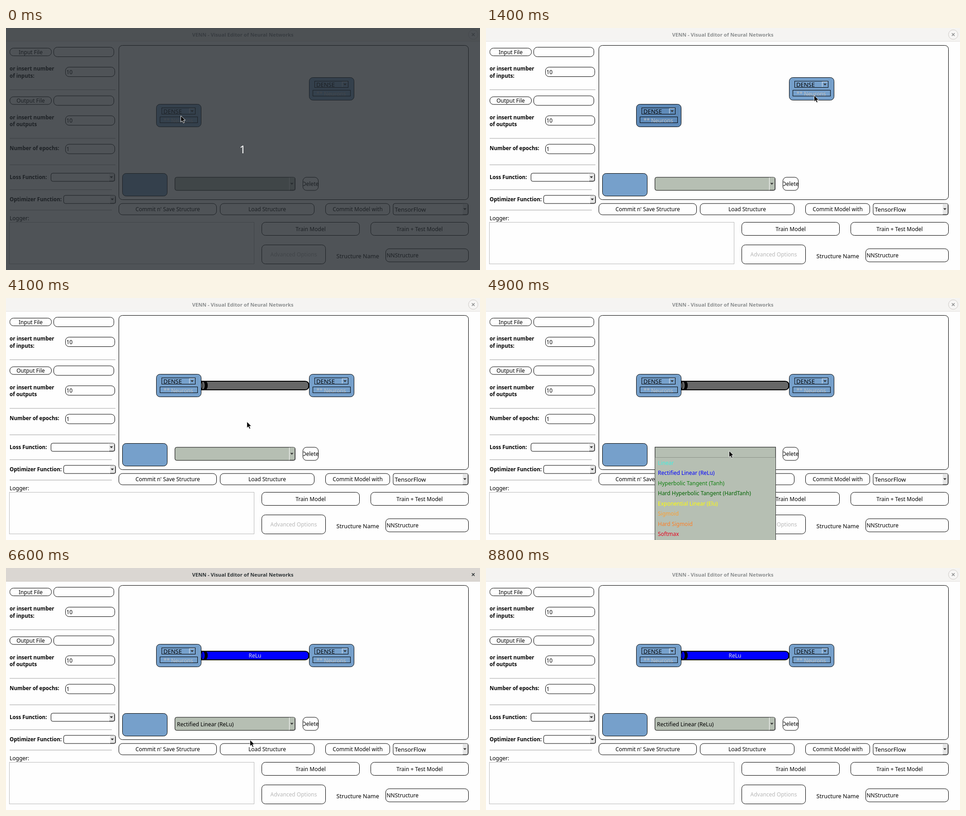
An HTML page that plays this animation: 1048 by 535 pixels, repeating every 8900 ms.

```html
<!DOCTYPE html>
<html lang="en">
<head>
<meta charset="utf-8">
<title>Visual Editor of Neural Networks</title>
<style>
html, body { margin: 0; width: 100%; height: 100%; overflow: hidden; background: #fefefe; }
svg { display: block; font: 12px "Noto Sans", "Open Sans", sans-serif; }
text { white-space: pre; }
.bold { font-weight: bold; font-size: 11.6px; }
</style>
</head>
<body>
<svg id="stage" width="1048" height="535" viewBox="0 0 1048 535"></svg>
<script>
const LOOP = 8900, STEP = 100, ROW = 22.5;
const BLUE = '#76a0cb', SAGE = '#b6bfb3', PAPER = '#fefefe';

const rect = (x, y, w, h, rx = 8, fill = PAPER, stroke = '#000') =>
  `<rect x="${x + .5}" y="${y + .5}" width="${w}" height="${h}" rx="${rx}" fill="${fill}" stroke="${stroke}"/>`;
const text = (x, y, s, o = '') => `<text x="${x}" y="${y}" ${o}>${s}</text>`;
const mid = (x, y, s, o = '') => text(x, y, s, 'text-anchor="middle" ' + o);
const bold = (x, y, s) => text(x, y, s, 'class="bold"');
const path = (d, stroke, width = 1, fill = 'none') =>
  `<path d="${d}" stroke="${stroke}" stroke-width="${width}" fill="${fill}"/>`;
const arrow = (x, y) => path(`M${x - 3.5} ${y - 2}h7l-3.5 4z`, 'none', 0, '#333');
const button = (x, y, w, h, s, o) => rect(x, y, w, h) + mid(x + w / 2 + .5, y + h / 2 + 5, s, o);
const field = (x, y, w, h, s = '') => rect(x, y, w, h) + text(x + 2.5, y + h / 2 + 5.2, s);
const rule = (y, end) => path(`M8 ${y + .5}H${end}`, '#a0a0a0');

function combo(x, y, w, h, fill = PAPER, side = '#e6e6e6') {
  const right = x + w, bottom = y + h;
  return rect(x, y, w, h, 4, fill) +
    rect(right - 12, y + 1, 11, h - 2, 2, side, side) +
    path(`M${right - 12.5} ${y + 1}V${bottom}`, '#fff') +
    path(`M${right - 12} ${bottom}h9q3 0 3 -3V${y + 3}`, '#444', 1.5) +
    arrow(right - 7, y + h / 2 + .5);
}

const node = (x, y, fill) =>
  rect(x, y, 99, 50, 8, fill) +
  rect(x + 12, y + 8, 74, 14, 0, 'none') +
  text(x + 16, y + 20.7, 'DENSE', 'font-size="13"') +
  path(`M${x + 73.5} ${y + 21}v-11h12`, '#dfe8f1') +
  arrow(x + 79.5, y + 16) +
  rect(x + 8, y + 28, 83, 13, 0, 'none') +
  mid(x + 49, y + 40.5, '** Neurons', 'fill="#c0c0c0"');

const link = (fill, label) =>
  path('M432 184H661Q669.5 184 669.5 193.5T661 203H432z', '#000', 2, fill) +
  path('M432 183h8q6 2 6 10.5t-6 10h-8z', 'none', 0, '#000') +
  `<ellipse cx="435.5" cy="193.5" rx="3.8" ry="8.5" fill="${fill}"/>` +
  path('M433 186q4 7.5 0 15', '#000') +
  mid(550.5, 197.8, label, 'fill="#ddd"');

const ITEMS = [
  ['', '#000'], ['Linear', '#40f0e0'], ['Rectified Linear (ReLu)', '#00f'],
  ['Hyperbolic Tangent (Tanh)', '#108010'], ['Hard Hyperbolic Tangent (HardTanh)', '#006400'],
  ['Exponential Linear (Elu)', '#ff0'], ['Sigmoid', '#ffa030'],
  ['Hard Sigmoid', '#ff7f24'], ['Softmax', '#e8001c']
];

const menu = hover => rect(373, 329, 267, 220, 0, SAGE, '#333') +
  ITEMS.map(([s, c], i) => {
    const y = 330 + ROW * i, on = i === hover;
    return (on ? rect(374, Math.round(y), 265, 22, 0, 'none', '#8c938a') : '') +
      text(380, y + 16.3, s, `fill="${on ? '#7c7c7c' : c}"`);
  }).join('');

function titleBar(active) {
  const ink = active ? '#2e3436' : '#8b8e8f';
  return `<rect width="1048" height="30" fill="${active ? '#dad6d2' : '#f5f4f2'}"/>` +
    path('M0 29.5H1048', active ? '#c8c3bd' : '#e2dfdc') +
    mid(523.5, 19, 'VENN - Visual Editor of Neural Networks',
      `font-weight="bold" font-size="11.2" fill="${ink}"`) +
    (active ? '' : '<circle cx="1033" cy="14.5" r="10.5" fill="#f7f6f5" stroke="#cdc9c5"/>') +
    path('M1030 11.5l6 6m0 -6l-6 6', ink, 1.7);
}

const fileGroup = (name, label, y) =>
  button(8, y + 1, 92, 17, name + ' File') + field(105, y - 1, 133, 21) +
  bold(8, y + 51, 'or insert number') + bold(8, y + 66.5, label) +
  field(131, y + 43, 109, 21, '10') + rule(y + 93, 242);

const form =
  fileGroup('Input', 'of inputs:', 43) + fileGroup('Output', 'of outputs', 150.5) +
  bold(8, 269.5, 'Number of epochs:') + field(131, 256.5, 109, 21, '1') + rule(302, 242) +
  bold(8, 333.5, 'Loss Function:') + combo(99, 320.5, 141, 18) + rule(357, 234) +
  bold(8, 382.5, 'Optimizer Function:') + combo(127, 369.5, 115, 18) + rule(402, 234) +
  text(8, 425, 'Logger:') + rect(7, 429, 541, 92, 0, PAPER, '#b8b8b8') +
  rect(249, 38, 773, 341) + rect(257, 321, 99, 50, 8, BLUE) +
  '<clipPath id="clip"><rect x="656" y="329" width="35" height="31"/></clipPath>' +
  rect(656, 329.5, 34, 29) + mid(673, 349.3, 'Delete', 'clip-path="url(#clip)"') +
  button(249, 387.5, 216, 25, "Commit n' Save Structure") +
  button(473, 387.5, 208, 25, 'Load Structure') +
  button(706, 387.5, 142, 25, 'Commit Model with') +
  combo(855.5, 387.5, 166, 25) + text(859.5, 405.5, 'TensorFlow', 'font-size="13"') +
  button(565, 429, 216, 29, 'Train Model') + button(806, 429, 216, 29, 'Train + Test Model') +
  button(565, 479, 141, 42, 'Advanced Options', 'fill="#b8b8b8"') +
  text(730.5, 509, 'Structure Name', 'font-size="12.7"') +
  field(839, 487.5, 183, 29, 'NNStructure');

// Pointer strokes: [start ms, end ms, x, y]; it rests in between
const STROKES = [
  [1100, 1400, 725, 149], [1500, 1600, 745, 149], [2400, 2500, 741, 164],
  [2500, 2600, 551, 175], [2700, 3200, 526, 191], [3800, 4600, 537, 338],
  [5200, 5300, 539, 354], [5400, 6000, 538, 377], [6200, 6300, 539, 380],
  [7600, 7700, 585, 322], [7700, 7800, 757, 180], [7900, 8400, 105, 4]
];
const easeOut = u => 1 - (1 - u) ** 1.75;

function pointerAt(t) {
  let x = 386, y = 194;
  for (const [from, to, x1, y1] of STROKES) {
    const k = easeOut(Math.min(1, Math.max(0, (t - from) / (to - from))));
    x += (x1 - x) * k;
    y += (y1 - y) * k;
  }
  return [x, y];
}

const pointer = (x, y) => `<g transform="translate(${x + .5} ${y})">` +
  path('M0 0V14L3.2 11 5.5 16 8 15 5.7 10H10z', '#fff', .9, '#000') + '</g>';

function scene(t) {
  const [x, y] = pointerAt(t);
  const linked = t >= 2000, done = t >= 6600, open = t >= 4800 && !done;
  const picked = t >= 1000 && !linked;
  let s = form + titleBar(done && t < 8800);
  if (linked) s += link(done ? '#00f' : t >= 3600 ? '#676767' : PAPER, done ? 'ReLu' : '');
  s += node(332, 168, picked ? '#5f8ab8' : BLUE) + node(670, linked ? 168 : 109, BLUE);
  s += open ? menu(Math.floor((y - 330) / ROW))
    : combo(373, 329.5, 266, 29, SAGE, SAGE) + text(378, 349.5, done ? ITEMS[2][0] : '');
  if (t < 100) s += '<rect width="1048" height="535" fill="#24282e" fill-opacity=".8"/>' +
    mid(523, 276.5, '1', 'font-size="24" fill="#fff"');
  return t < 8500 ? s + pointer(x, y) : s;
}

const stage = document.getElementById('stage');
let start, shown;
function frame(now) {
  start ??= now;
  const t = Math.floor((now - start) % LOOP / STEP) * STEP;
  if (t !== shown) stage.innerHTML = scene(shown = t);
  requestAnimationFrame(frame);
}
requestAnimationFrame(frame);
</script>
</body>
</html>
```
